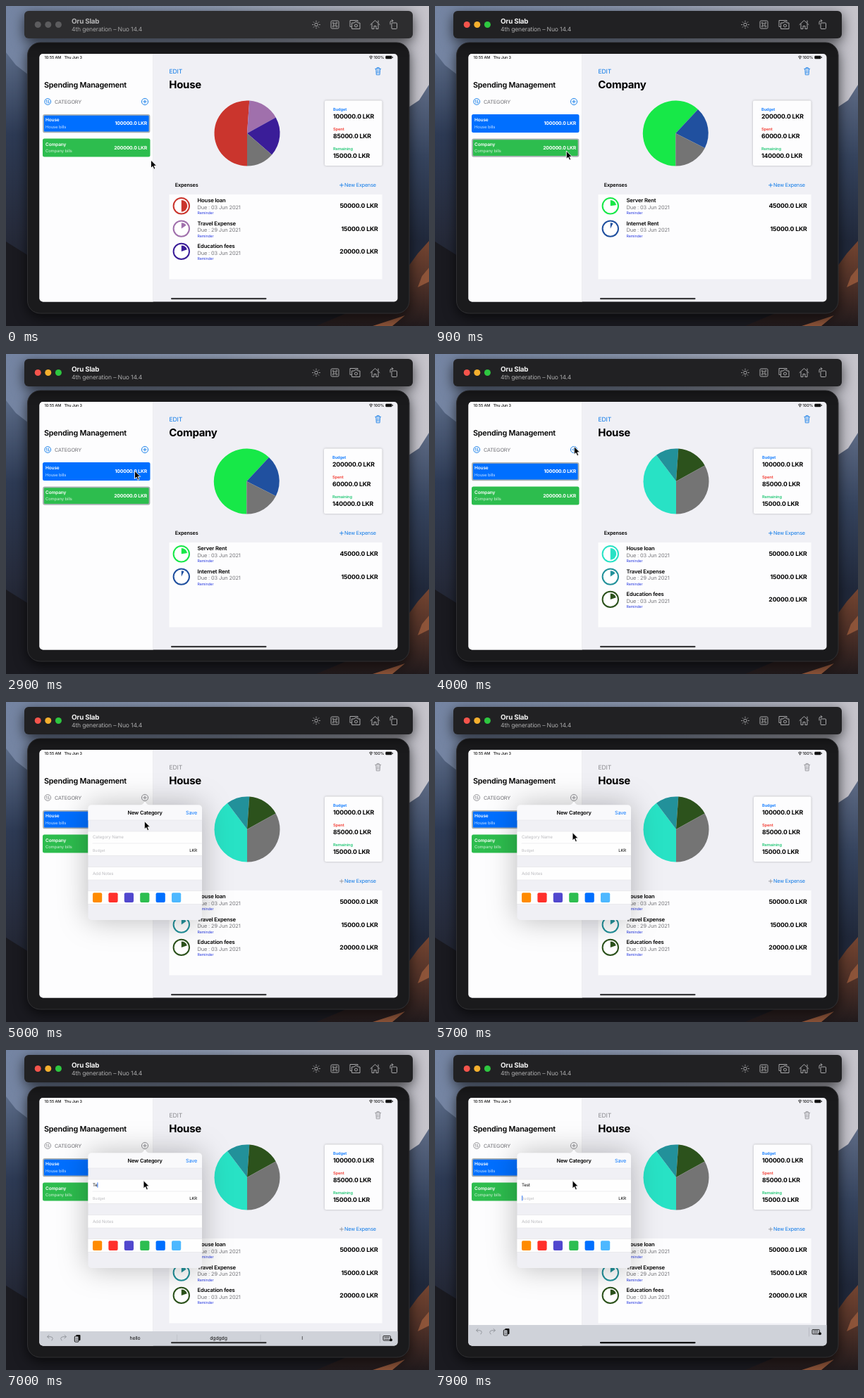
An HTML page that plays this animation: 600 by 455 pixels, repeating every 8 s.

```html
<!DOCTYPE html>
<html lang="en">
<head>
<meta charset="utf-8">
<title>Spending Management</title>
<style>
html, body { margin: 0; width: 100%; height: 100%; overflow: hidden; background: #25293a; }
svg { display: block; width: 600px; height: 455px; font-family: Inter, "Liberation Sans", sans-serif; }
text { white-space: pre; letter-spacing: -.02em; text-rendering: geometricPrecision; }
.window { filter: drop-shadow(0 5px 9px #000a); }
.popover { filter: drop-shadow(0 0 20px #0004); }
.card { filter: drop-shadow(0 0 1.5px #0004); }
</style>
</head>
<body>
<svg viewBox="0 0 600 455">
  <defs>
    <linearGradient id="sky">
      <stop stop-color="#7484a2"/><stop offset=".5" stop-color="#8f9bb2"/><stop offset="1" stop-color="#c6c4cb"/>
    </linearGradient>
    <linearGradient id="slope" x2="0" y2="1">
      <stop stop-color="#5a6a86"/><stop offset=".3" stop-color="#2d3a54"/>
      <stop offset=".65" stop-color="#262b3b"/><stop offset="1" stop-color="#17181f"/>
    </linearGradient>
    <linearGradient id="ridge" x2="0" y2="1">
      <stop stop-color="#5d6a84"/><stop offset=".3" stop-color="#35435d"/><stop offset=".65" stop-color="#20283a"/>
    </linearGradient>
    <linearGradient id="rock" x2="0" y2="1">
      <stop stop-color="#754531"/><stop offset=".5" stop-color="#4f3128"/><stop offset="1" stop-color="#211a1c"/>
    </linearGradient>
    <clipPath id="screen"><rect x="47.5" y="68" width="508" height="352.5" rx="5"/></clipPath>
  </defs>
  <rect width="600" height="455" fill="url(#sky)"/>
  <path d="M0 66L14 84 32 98 300 200V455H0z" fill="url(#slope)"/>
  <path d="M600 112L586 134 568 146 300 200V455H600z" fill="url(#ridge)"/>
  <path d="M0 335L32 355 300 425H600V455H0z" fill="#1a1a20"/>
  <path d="M600 334L584 352 568 374 480 438 440 455H600z" fill="url(#rock)"/>
  <path d="M600 372L590 384 584 400 600 392zM566 440L548 455H520z" fill="#8d5439"/>
  <g id="scene"></g>
</svg>
<script>
const LOOP = 8000, STEP = 100;
const BLUE = '#0a78e8', GREY = '#747474', MUTED = '#8a8a8e';
const scene = document.getElementById('scene');

const text = (x, y, size, value, fill = '#000', weight = 400, anchor = 'start') =>
  `<text x="${x}" y="${y}" font-size="${size}" fill="${fill}" font-weight="${weight}" text-anchor="${anchor}">${value}</text>`;
const rect = (x, y, w, h, fill, r = 0, more = '') =>
  `<rect x="${x}" y="${y}" width="${w}" height="${h}" rx="${r}" fill="${fill}" ${more}/>`;
const dot = (x, y, r, fill, more = '') => `<circle cx="${x}" cy="${y}" r="${r}" fill="${fill}" ${more}/>`;
const line = (d, stroke, width = 1) =>
  `<path d="${d}" fill="none" stroke="${stroke}" stroke-width="${width}" stroke-linecap="round" stroke-linejoin="round"/>`;
const clamp = u => Math.min(1, Math.max(0, u));

// Angles in degrees, clockwise from the top
function wedge(x, y, r, from, sweep, fill) {
  const at = deg => {
    const a = deg * Math.PI / 180;
    return `${x + r * Math.sin(a)} ${y - r * Math.cos(a)}`;
  };
  return `<path d="M${x} ${y}L${at(from)}A${r} ${r} 0 ${+(sweep > 180)} 1 ${at(from + sweep)}z" fill="${fill}"/>`;
}

function pie(x, y, r, slices) {
  let from = 180;
  return slices.map(([sweep, fill]) => {
    const part = wedge(x, y, r, from, sweep, fill);
    from += sweep;
    return part;
  }).join('');
}

const house = (colors, sweeps) => ({
  name: 'House', x: 342, cardX: 452, money: ['100000.0', '85000.0', '15000.0'],
  slices: sweeps.map((s, i) => [s, colors[i] || GREY]),
  rows: [
    ['House loan', '03', '50000.0', .5, colors[0]],
    ['Travel Expense', '29', '15000.0', .15, colors[1]],
    ['Education fees', '03', '20000.0', .2, colors[2]],
  ],
});
const houseWarm = house(['#ca352d', '#a070ac', '#3a1d98'], [184, 57, 70, 49]);
const houseCool = house(['#28e2c5', '#22919a', '#2c521c'], [143, 41, 57, 119]);
const company = {
  name: 'Company', x: 341.3, cardX: 451, money: ['200000.0', '60000.0', '140000.0'],
  slices: [[223, '#17e848'], [74, '#20509f'], [63, GREY]],
  rows: [
    ['Server Rent', '03', '45000.0', .225, '#17e848'],
    ['Internet Rent', '03', '15000.0', .075, '#20509f'],
  ],
};

// Pointer path: time, x, y
const pointer = [[0, 205.5, 219], [100, 205.5, 219], [600, 186.3, 206], [1900, 186.3, 206], [2700, 182.5, 166],
  [3200, 182.5, 166], [3800, 197.3, 131.5], [4400, 197.3, 131.5], [4900, 196.3, 169.5],
  [5300, 196.3, 169.5], [5700, 195, 185.5], [LOOP, 195, 185.5]];

function pointerAt(t) {
  const i = pointer.findIndex(p => p[0] > t);
  const [t0, x0, y0] = pointer[i - 1], [t1, x1, y1] = pointer[i];
  const u = (t - t0) / (t1 - t0), k = u * u * (3 - 2 * u);
  return [x0 + (x1 - x0) * k, y0 + (y1 - y0) * k];
}

function titleBar(active) {
  const c = '#a9a9ab';
  const lights = active ? ['#f4544c', '#f5b02e', '#2ec740'] : Array(3).fill('#5c5c5e');
  let rays = '';
  for (let i = 0; i < 8; i++) {
    const a = i * Math.PI / 4, s = Math.sin(a), k = Math.cos(a);
    rays += `M${440 + 4.3 * s} ${26.5 + 4.3 * k}L${440 + 5.3 * s} ${26.5 + 5.3 * k}`;
  }
  return `<g class="window">${rect(26, 7, 551, 39, active ? '#212123' : '#2d2d2f', 6)}</g>` +
    lights.map((fill, i) => dot(45.2 + i * 14.6, 26.5, 4.5, fill)).join('') +
    text(93, 24.5, 9.8, 'Oru Slab', active ? '#f2f2f2' : '#b5b5b6', 700) +
    text(93, 35.8, 8.6, '4th generation – Nuo 14.4', active ? '#a9a9aa' : '#a0a0a1') +
    dot(440, 26.5, 2.2, 'none', `stroke="${c}"`) + line(rays, c) +
    rect(461, 21, 11, 11, 'none', 1.5, `stroke="${c}"`) +
    line('M465 25h3v3h-3zM465 25h-1a1 1 0 1 1 1-1zM468 25v-1a1 1 0 1 1 1 1zM468 28h1a1 1 0 1 1-1 1zM465 28v1a1 1 0 1 1-1-1z', c, .7) +
    line('M489.5 29.5H488v-9h11V22M491 24h3l1-1.5h3l1 1.5h3v8.5h-11z', c) + dot(496.5, 28, 2, 'none', `stroke="${c}"`) +
    line('M517 26.5L523.5 20.5 530 26.5M519 25.500v7h3v-4h3v4h3v-7M528 21v2.5', c) +
    rect(547, 24, 7.5, 8.5, 'none', 1, `stroke="${c}"`) + line('M545 26v-3q0-2 2-2h2M547.5 19.5l1.5 1.5-1.5 1.5', c);
}

function statusBar() {
  return text(54.5, 75, 5.5, '10:55 AM', '#111', 500) + text(82.5, 75, 5.5, 'Thu Jun 3', '#111', 500) +
    text(536, 75, 5.5, '100%', '#111', 500, 'end') +
    rect(538.3, 70.7, 9.2, 4.6, '#111', 1.2) + rect(548, 72, .8, 2, '#111') +
    line('M515.4 72q2.3-2 4.6 0M516.4 73.4q1.3-1 2.6 0', '#111', .9) + dot(517.7, 74.7, .7, '#111');
}

function category(y, name, amount, fill, selected) {
  return (selected
    ? rect(53, y + .9, 150.5, 24.5, fill, 2, 'stroke="#a9b0b2" stroke-width="1.8"')
    : rect(52, y, 152.5, 26, fill, 2.5)) +
    text(56, y + 10.3, 6.5, name, '#fff', 600) + text(56, y + 19.7, 5.9, name + ' bills', '#ffffffc8') +
    text(200, y + 15.4, 6.8, amount + ' LKR', '#fff', 700, 'end');
}

function sidebar(view, tint) {
  return rect(47, 68, 161.5, 353, '#fdfdfe') +
    text(54, 115.5, 10.8, 'Spending Management', '#000', 600) +
    dot(59.2, 136, 4.4, 'none', `stroke="${tint}" stroke-width=".9"`) +
    line('M58 138.2v-4.4l-1.2 1.2M60.4 133.8v4.4l1.2-1.2', tint, .8) +
    text(69, 138.8, 7.3, 'CATEGORY', '#727277') +
    dot(197, 136, 4.6, 'none', `stroke="${tint}" stroke-width=".9"`) + line('M194.7 136h4.6M197 133.7v4.6', tint, .9) +
    category(154, 'House', '100000.0', '#006fff', view !== company) +
    category(188.4, 'Company', '200000.0', '#2dbd4e', view === company);
}

function expense([name, day, amount, share, color], i) {
  const y = 284.3 + i * 32.3;
  return dot(248.8, y, 11.2, '#fff', `stroke="${color}" stroke-width="2"`) +
    wedge(248.8, y, 8.4, 0, share * 360, color) +
    text(271.5, y - 4.9, 7.7, name, '#000', 600) + text(271.5, y + 4.6, 7.45, `Due : ${day} Jun 2021`, '#77777b') +
    text(271.5, y + 11.9, 5.3, 'Reminder', '#2638e0') +
    text(527.5, y + 3, 8.7, amount + ' LKR', '#000', 700, 'end');
}

function detail(view, tint) {
  const labels = [['Budget', '#0a78ff'], ['Spent', '#f23a30'], ['Remaining', '#22c775']];
  const left = view.cardX + 12;
  return text(231.5, 96.2, 8.6, 'EDIT', tint) + text(231.3, 117, 15, view.name, '#000', 700) +
    line('M523.7 89.3h8M526.2 89v-1.5h3V89M524.7 89.5l.6 8.3h4.8l.6-8.3M526.6 91.3v4.5M528.8 91.3v4.5', tint, .8) +
    pie(view.x, 181, 46.5, view.slices) +
    `<g class="card">${rect(view.cardX, 134.5, 533.5 - view.cardX, 92.5, '#fdfdfe', 2)}</g>` +
    labels.map(([label, fill], i) => text(left, 149.2 + i * 28, 5.7, label, fill, 600) +
      text(left, 160 + i * 28, 8.7, view.money[i] + ' LKR', '#000', 700)).join('') +
    text(239.7, 257.4, 7.25, 'Expenses', '#000', 600) +
    line('M473.5 254.8h5M476 252.3v5', tint, .8) + text(480, 257.4, 7.2, 'New Expense', BLUE) +
    rect(231.5, 268, 302, 120.5, '#fdfdfe') + view.rows.map(expense).join('');
}

function popover(typed, focus, caretOn) {
  const swatches = ['#ff8b00', '#ff302b', '#5148ce', '#2dbe50', '#006fff', '#4db8ff'];
  const hint = '#bdbdc1', rule = '#dcdce1';
  const white = [[184, 34.5], [234.5, 18.5], [268.5, 19]];
  const caretY = focus === 'name' ? 188.3 : 207;
  return `<path d="M190 147q4-1 7-5.5q3 4.5 7 5.5z" fill="#f9f9fb"/>` +
    rect(116.5, 146.5, 161.5, 163.5, '#f0f0f5', 5) +
    `<path d="M116.5 168v-16.5q0-5 5-5H273q5 0 5 5V168z" fill="#f9f9fb"/>` +
    white.map(([y, h]) => rect(116.5, y, 161.5, h, '#fefefe') +
      line(`M116.5 ${y}H278M116.5 ${y + h}H278`, rule, .5)).join('') +
    line('M116.5 168H278M123 201H278', rule, .5) +
    text(197.2, 160.2, 7.4, 'New Category', '#000', 600, 'middle') + text(271, 160.2, 7.2, 'Save', '#0a78ff', 400, 'end') +
    (typed ? text(123, 194.3, 6.1, typed) : text(123, 194.3, 6.1, 'Category Name', hint)) +
    text(123, 212.8, 5.3, 'Budget', hint) + text(271, 212.8, 5.9, 'LKR', '#000', 400, 'end') +
    text(123, 245.8, 6.1, 'Add Notes', hint) +
    swatches.map((fill, i) => rect(123 + i * 22.4, 271.3, 13.2, 13.7, fill, 2)).join('') +
    (focus && caretOn ? rect(123.2 + typed.length * 3.1 * (focus === 'name'), caretY, 1, 7.3, '#3478f6') : '');
}

// Icons sit at height y; word suggestions are optional
function keyboard(top, y, words) {
  const undo = 'M65 413q2.500-3 .5-4.500q-1.500-1.200-6.500-.8M61 405.500l-2.500 2.200 2.500 2.200'.replace(/00\b/g, '');
  const suggestions = [['hello', 183], ['dgdgdg', 301.5], ['I', 420]];
  return rect(47, top, 509, 421 - top, '#cfd2d9') + `<g transform="translate(0 ${y - 410})">` +
    line(undo, '#8f9299', .9) + `<g transform="matrix(-1 0 0 1 144 0)">${line(undo, '#8f9299', .9)}</g>` +
    rect(99.3, 405, 6.2, 8, '#111', 1) + rect(97.3, 407, 5.7, 8, '#cfd2d9', 1, 'stroke="#111"') +
    line('M99 410h2.5M99 412.5h2.5', '#111', .7) +
    line('M530.5 404v12', '#a9acb4', .6) +
    rect(535, 406.5, 10.5, 6.5, 'none', 1, 'stroke="#111" stroke-width=".9"') +
    line('M537 408.5h6.5M537 411h6', '#111', .8) + dot(546, 412.3, 2, '#111') +
    (words ? suggestions.map(([word, x]) => text(x, 412, 6.9, word, '#111', 400, 'middle')).join('') +
      line('M242.5 405v9M361 405v9', '#b7bac1', .6) : '') + '</g>';
}

function draw(t) {
  const view = t < 700 ? houseWarm : t < 3200 ? company : houseCool;
  const fade = clamp((t - 4300) / 200);
  const tint = fade ? MUTED : BLUE;
  const typed = 'Test'.slice(0, Math.max(0, Math.floor((t - 6500) / 200)));
  const focus = t < 5900 ? '' : t < 7600 ? 'name' : 'budget';
  const caretOn = typed || (t - 5900) % 1000 < 600;
  const rise = clamp((t - 5800) / 300);
  const numeric = focus === 'budget';
  const barTop = numeric ? 391 : 421 - 21 * rise;
  const [x, y] = pointerAt(t);

  scene.innerHTML = `<g class="window">${rect(30.5, 52, 541.5, 385, '#1a1a1c', 18, 'stroke="#303033"')}</g>` +
    titleBar(t >= 600) +
    `<g clip-path="url(#screen)">${rect(47, 68, 509, 353, '#f0f0f5')}` +
    sidebar(view, tint) + line('M208.5 68v353', '#e2e2e7', .5) + detail(view, tint) + statusBar() +
    (fade ? `<g class="popover" opacity="${fade}">${popover(typed, focus, caretOn)}</g>` : '') +
    (rise ? keyboard(barTop, barTop + 10, !numeric) : '') +
    rect(234, 415, 135.5, 2.3, numeric ? '#000' : '#38383a', 1.1) + '</g>' +
    `<path transform="translate(${x} ${y})" d="M0 0V11.5L2.6 9.1 4.4 13.2 6.4 12.3 4.6 8.3H8.2z" fill="#000" stroke="#fff" stroke-width=".9"/>`;
}

let shown = -1;
function tick() {
  const t = Math.floor(performance.now() % LOOP / STEP) * STEP;
  if (t !== shown) draw(shown = t);
  requestAnimationFrame(tick);
}
tick();
</script>
</body>
</html>
```
